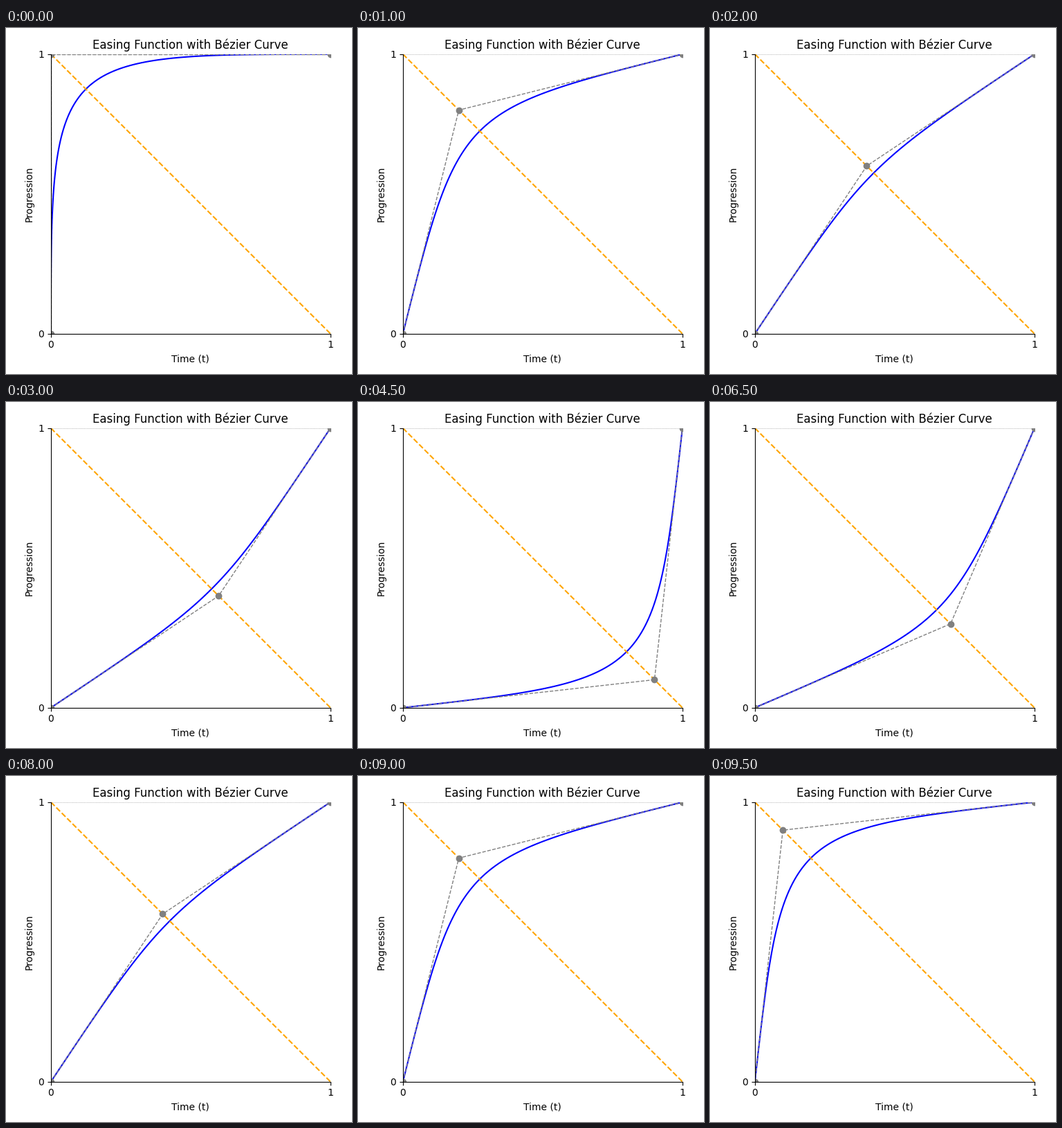
Write a matplotlib script that moves like this. It is 500 by 500 pixels and loops after 10000 ms.

```python
import matplotlib.pyplot as plt
import numpy as np
from matplotlib.animation import FuncAnimation

FRAMES = 20
INTERVAL = 500

fig, ax = plt.subplots(figsize=(5, 5), dpi=100)
ax.set(xlim=(0, 1), ylim=(0, 1), xticks=[0, 1], yticks=[0, 1],
       xlabel="Time (t)", ylabel="Progression",
       title="Easing Function with Bézier Curve")
ax.set_aspect("equal")
ax.spines[["top", "right"]].set_visible(False)

ax.axhline(1, color="gray", linestyle=":", linewidth=0.5)
curve, = ax.plot([], [], color="blue")
ax.plot([0, 1], [1, 0], color="orange", linestyle="--")
handles, = ax.plot([], [], "o--", color="gray", linewidth=1)
fig.tight_layout()

s = np.linspace(0, 1, 100)


def bezier(control):
    """Cubic from 0 to 1 whose two inner control values coincide."""
    return 3 * s * (1 - s) * control + s**3


def update(frame):
    x = 1 - abs(1 - 2 * frame / FRAMES)
    y = 1 - x
    curve.set_data(bezier(x), bezier(y))
    handles.set_data([0, x, 1], [0, y, 1])
    return curve, handles


anim = FuncAnimation(fig, update, frames=FRAMES, interval=INTERVAL,
                     repeat=True, repeat_delay=0)
plt.show()
```
